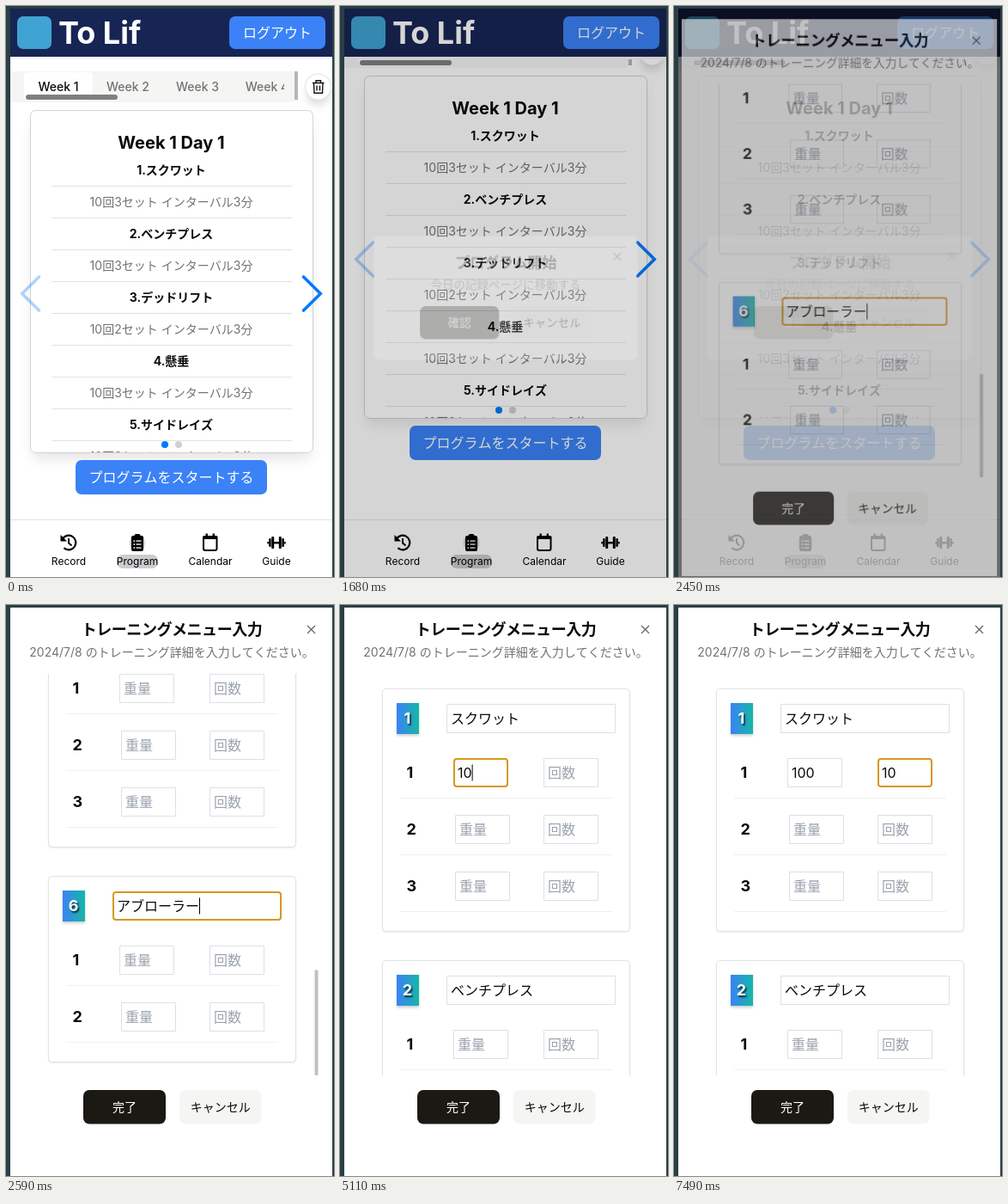
Write an HTML page with a canvas that moves like this. It is 382 by 664 pixels and loops after 8000 ms.

```html
<!DOCTYPE html>
<html lang="ja">
<head>
<meta charset="utf-8">
<title>Training program</title>
<style>
html, body { margin: 0; width: 100%; height: 100%; overflow: hidden; background: #2a3f45; }
canvas { display: block; width: 382px; height: 664px; }
</style>
</head>
<body>
<canvas id="stage"></canvas>
<script>
const W = 382, H = 664, LOOP = 8000, STEP = 70;
const FONT = 'Inter, "Noto Sans CJK JP", "Noto Sans CJK", sans-serif';
const INK = '#0c0a09', MUTED = '#737373', BLUE = '#3b82f6', SWIPE = '#007aff';
const DARK = '#1a1914', PALE = '#f5f5f4', LINE = '#e2e2e4', RING = '#d6981c';
const EXERCISES = [
  ['スクワット', 3], ['ベンチプレス', 3], ['デッドリフト', 2],
  ['懸垂', 3], ['サイドレイズ', 3], ['アブローラー', 2]
];
const SCROLL_MAX = 1296;

const dpr = window.devicePixelRatio || 1;
function makeContext(canvas) {
  canvas.width = W * dpr;
  canvas.height = H * dpr;
  const c = canvas.getContext('2d');
  c.scale(dpr, dpr);
  return c;
}
const screen2d = makeContext(document.getElementById('stage'));
const layer2d = makeContext(document.createElement('canvas'));
let g = screen2d;

// Drawing helpers
function rect(x, y, w, h, color, r = 0) {
  g.fillStyle = color;
  g.beginPath();
  g.roundRect(x, y, w, h, r);
  g.fill();
}
function frame(x, y, w, h, color, r = 0, lw = 1) {
  g.strokeStyle = color;
  g.lineWidth = lw;
  g.beginPath();
  g.roundRect(x + lw / 2, y + lw / 2, w - lw, h - lw, r);
  g.stroke();
}
function stroke(color, lw, ...lines) {
  g.strokeStyle = color;
  g.lineWidth = lw;
  g.beginPath();
  for (const [x, y, ...rest] of lines) {
    g.moveTo(x, y);
    for (let i = 0; i < rest.length; i += 2) g.lineTo(rest[i], rest[i + 1]);
  }
  g.stroke();
}
function disc(x, y, r, color) {
  g.fillStyle = color;
  g.beginPath();
  g.arc(x, y, r, 0, 7);
  g.fill();
}
function withShadow(dy, blur, alpha, draw) {
  g.save();
  g.shadowColor = `rgba(0,0,0,${alpha})`;
  g.shadowOffsetY = dy * dpr;
  g.shadowBlur = blur * dpr;
  draw();
  g.restore();
}
function text(s, x, cy, size, color, weight = 400, align = 'center', spacing = 0) {
  g.font = `${weight} ${size}px ${FONT}`;
  g.letterSpacing = spacing + 'px';
  g.textAlign = align;
  g.fillStyle = color;
  g.fillText(s, x, cy + size * 0.36);
  g.letterSpacing = '0px';
}
function clipped(x, y, w, h, draw) {
  g.save();
  g.beginPath();
  g.rect(x, y, w, h);
  g.clip();
  draw();
  g.restore();
}
function button(x, y, w, h, label, bg, fg, size, weight = 500) {
  rect(x, y, w, h, bg, 7);
  text(label, x + w / 2, y + h / 2, size, fg, weight);
}
function cross(x, y) {
  stroke('#666', 1.3, [x - 4.5, y - 4.5, x + 4.5, y + 4.5], [x + 4.5, y - 4.5, x - 4.5, y + 4.5]);
}

// Page behind the dialogs
function drawTabs() {
  rect(5, 76, 331, 36, PALE, 4);
  rect(21, 77, 80, 33, '#fff', 4);
  clipped(5, 76, 319, 36, () => {
    for (let i = 0; i < 4; i++)
      text('Week ' + (i + 1), 61 + 81 * i, 94, 14, i ? MUTED : INK, 500);
  });
  rect(336, 76, 4, 33, '#b6b6b6');
  rect(23, 103, 107, 6, '#808080', 3);

  withShadow(8, 8, 0.12, () => disc(363.5, 94, 14, '#fff'));
  disc(363.5, 94, 15.5, '#e2e2e4');
  disc(363.5, 94, 14.5, '#fff');
  stroke('#111', 1.4, [357, 89.5, 370.5, 89.5], [361, 89, 361, 86.8, 366.5, 86.8, 366.5, 89],
    [358.5, 90, 359, 101.2, 368.5, 101.2, 369, 90], [362, 92.5, 362, 98.5], [365.5, 92.5, 365.5, 98.5]);
}
function drawCard() {
  withShadow(10, 15, 0.1, () => rect(31, 124, 324, 393, '#fff', 6));
  rect(28, 121, 330, 399, '#fff', 6);
  text('Week 1 Day 1', 192.5, 159, 20, INK, 700);
  clipped(29, 122, 328, 397, () => {
    EXERCISES.slice(0, 5).forEach(([name, sets], i) => {
      const y = 190.5 + 74 * i;
      text(`${i + 1}.${name}`, 192.5, y, 14, INK, 700);
      text(`10回${sets}セット インターバル3分`, 192.5, y + 37.5, 14, MUTED);
      rect(53, y + 18.5, 280, 1, LINE);
      rect(53, y + 55.5, 280, 1, LINE);
    });
  });
  frame(28, 121, 330, 399, '#d2d2d4', 6);
  disc(185, 510, 4, SWIPE);
  disc(201, 510, 4, '#d0d0d0');
  g.lineCap = 'round';
  stroke('rgba(0,122,255,.32)', 3.6, [38.5, 315, 18.8, 334.5, 38.5, 354]);
  stroke(SWIPE, 3.6, [346.5, 315, 366.2, 334.5, 346.5, 354]);
  g.lineCap = 'butt';
}
function drawHeader() {
  rect(5, 59, 375, 3, '#f6f5fb');
  rect(5, 3, 375, 56, '#172554');
  rect(13, 12, 40, 38, '#3fa3d3', 7);
  text('To Lif', 61, 31, 36, '#fff', 700, 'left');
  button(260, 12, 112, 38, 'ログアウト', BLUE, '#fff', 16);
}
function drawNav() {
  rect(5, 597, 375, 67, '#fff');
  rect(5, 597, 375, 1, LINE);
  rect(129, 638, 48, 16, '#cbcbd0', 7);
  rect(144, 615, 18, 19, '#d3d3d8', 8);
  const labels = [['Record', 73], ['Program', 153], ['Calendar', 238], ['Guide', 315]];
  for (const [s, x] of labels) text(s, x, 646, 12, '#000');

  // history
  g.strokeStyle = '#000';
  g.lineWidth = 2.3;
  g.beginPath();
  g.arc(73, 624, 8.3, -2.6, 2.3);
  g.stroke();
  g.fillStyle = '#000';
  g.beginPath();
  g.moveTo(63.5, 615);
  g.lineTo(63.5, 622.5);
  g.lineTo(71, 622.5);
  g.fill();
  stroke('#000', 2, [73, 619, 73, 624.5, 76.5, 627.5]);

  // clipboard
  rect(146, 616, 14, 18, '#000', 2);
  rect(149.5, 614, 7, 5, '#000', 2);
  for (const y of [622, 626, 630]) {
    rect(148.5, y - 0.7, 1.6, 1.6, '#fff');
    rect(151.5, y - 0.6, 6, 1.3, '#fff');
  }

  // calendar
  frame(229, 616, 17.5, 18, '#000', 2, 2);
  rect(229, 616, 17.5, 4, '#000', 2);
  rect(232.5, 613.5, 2.4, 4, '#000');
  rect(240.6, 613.5, 2.4, 4, '#000');

  // dumbbell
  rect(312, 623, 6, 2.4, '#000');
  for (const side of [-1, 1]) {
    rect(315 + side * 4.3 - 1.5, 617, 3, 14, '#000', 1);
    rect(315 + side * 7.6 - 1.2, 619, 2.4, 10, '#000', 1);
    rect(315 + side * 9.7 - 1, 623, 2, 2.4, '#000');
  }
}
function drawPage(scrollY) {
  rect(5, 3, 375, 661, '#fff');
  g.save();
  g.translate(0, -scrollY);
  drawTabs();
  drawCard();
  button(81, 528, 223, 40, 'プログラムをスタートする', BLUE, '#fff', 16);
  g.restore();
  drawHeader();
  drawNav();
}

// Dialogs
function drawConfirm() {
  rect(33, 262, 320, 150, '#fff', 7);
  text('プログラム開始', 193, 295, 18, INK, 700, 'center', -0.45);
  text('今日の記録ページに移動する', 193, 320.5, 14, MUTED);
  cross(328, 287);
  button(89, 347, 96, 40, '確認', DARK, '#fff', 14);
  button(201, 347, 96, 40, 'キャンセル', PALE, INK, 14);
}

function field(x, y, w, value, hint, focus, caret) {
  rect(x, y, w, 34, '#fff');
  if (focus) frame(x, y, w, 34, RING, 3, 2);
  else frame(x, y, w, 34, '#dfe0e3');
  text(value || hint, x + 5, y + 17, 16, value ? INK : '#9ca3af', 400, 'left');
  if (focus && caret) {
    const end = value ? g.measureText(value).width : 0;
    rect(x + 5 + end, y + 7.5, 1, 19, '#000');
  }
}
function drawSection(index, y, state) {
  const [name, sets] = EXERCISES[index];
  const h = 85 + 66 * sets;
  withShadow(1, 2, 0.1, () => rect(49.5, y + 0.5, 288, h - 1, '#fff', 4));
  frame(49, y, 289, h, LINE, 4);

  const fill = g.createLinearGradient(66, 0, 92, 0);
  fill.addColorStop(0, BLUE);
  fill.addColorStop(1, '#14b8a6');
  withShadow(2, 3, 0.2, () => rect(66, y + 17, 26, 36, fill));
  g.save();
  g.shadowColor = 'rgba(0,0,0,.75)';
  g.shadowOffsetX = g.shadowOffsetY = 1.5 * dpr;
  g.shadowBlur = 2 * dpr;
  text(index + 1, 78.5, y + 35, 18, '#fff', 700);
  g.restore();

  field(124, y + 18, 197, name, '', state.focus === 'name' + index, true);
  for (let i = 0; i < sets; i++) {
    const rowY = y + 81 + 66 * i;
    const first = index === 0 && i === 0;
    text(i + 1, 77.5, rowY + 17, 18, INK, 700, 'left');
    field(i ? 134 : 132, rowY, 64, first ? state.weight : '', '重量', first && state.focus === 'weight', state.caret);
    field(237, rowY, 64, first ? state.reps : '', '回数', first && state.focus === 'reps', state.caret);
    rect(70, rowY + 46, 247, 1, '#f0f0f1');
  }
}
function drawTraining(state) {
  rect(5, 3, 375, 661, '#fff');
  text('トレーニングメニュー入力', 193, 29, 18, INK, 700, 'center', -0.45);
  text('2024/7/8 のトレーニング詳細を入力してください。', 193, 54.5, 14, MUTED);
  cross(355.5, 28.5);
  clipped(5, 80, 375, 467, () => {
    let y = 97 - state.scroll;
    EXERCISES.forEach(([, sets], i) => {
      if (y < 560 && y > -300) drawSection(i, y, state);
      y += 118 + 66 * sets;
    });
  });
  if (state.bar > 0) {
    g.globalAlpha = state.bar;
    rect(359.5, 80.5 + 344 * state.scroll / SCROLL_MAX, 4, 122.5, '#c1c1c1', 1);
    g.globalAlpha = 1;
  }
  button(90, 564, 96, 39.5, '完了', DARK, '#fff', 14);
  button(202, 564, 95.5, 39.5, 'キャンセル', PALE, INK, 14);
}

// CSS "ease" curve
function ease(x) {
  if (x <= 0) return 0;
  if (x >= 1) return 1;
  const bez = (a, b, u) => 3 * a * u * (1 - u) ** 2 + 3 * b * u * u * (1 - u) + u ** 3;
  let lo = 0, hi = 1;
  for (let i = 0; i < 24; i++) {
    const mid = (lo + hi) / 2;
    if (bez(0.25, 0.25, mid) < x) lo = mid; else hi = mid;
  }
  return bez(0.1, 1, lo);
}
// 200 ms transition first seen at "from", already "lead" ms in
const progress = (t, from, lead) => t < from ? 0 : ease((t - from + lead) / 200);

// Fades and zooms a dialog with its dimming overlay
function present(p, cy, h, draw) {
  if (p <= 0) return;
  rect(5, 3, 375, 661, `rgba(0,0,0,${0.8 * p})`);
  if (p > 0.995) return draw();
  g = layer2d;
  g.clearRect(0, 0, W, H);
  draw();
  g = screen2d;
  clipped(5, 3, 375, 661, () => {
    const s = 0.95 + 0.05 * p;
    g.globalAlpha = p;
    g.translate(193, cy + (1 - p) * 0.02 * h);
    g.scale(s, s);
    g.drawImage(layer2d.canvas, -193, -cy, W, H);
  });
}

function scrollAt(t) {
  if (t < 2940) return SCROLL_MAX;
  if (t >= 3220) return 0;
  const x = (t - 2870) / 350;
  return SCROLL_MAX * (1 - x * x * (3 - 2 * x));
}
// Latest value whose start time has passed
function latest(t, start, ...steps) {
  for (const [at, value] of steps) if (t >= at) start = value;
  return start;
}
function stateAt(t) {
  return {
    scroll: scrollAt(t),
    bar: latest(t, 1, [3640, 0.5], [3780, 0]),
    focus: latest(t, 'name5', [3920, 'weight'], [6230, 'reps']),
    weight: latest(t, '', [4480, '1'], [5110, '10'], [5250, '100']),
    reps: latest(t, '', [6650, '1'], [6930, '10']),
    caret: latest(t, true, [5740, false], [6230, true], [7490, false])
  };
}

function render(t) {
  rect(0, 0, W, H, '#2a3f45');
  const opened = progress(t, 2450, 68);
  if (opened < 1) {
    drawPage(t < 1680 ? 0 : 40);
    const confirm = progress(t, 1680, 32) * (1 - progress(t, 2450, 86));
    present(confirm, 337, 150, drawConfirm);
  }
  present(opened, 333, 660, () => drawTraining(stateAt(t)));
}

const began = performance.now();
function tick() {
  const t = (performance.now() - began + 1) % LOOP;
  render(Math.floor(t / STEP) * STEP);
  requestAnimationFrame(tick);
}
tick();
</script>
</body>
</html>
```
